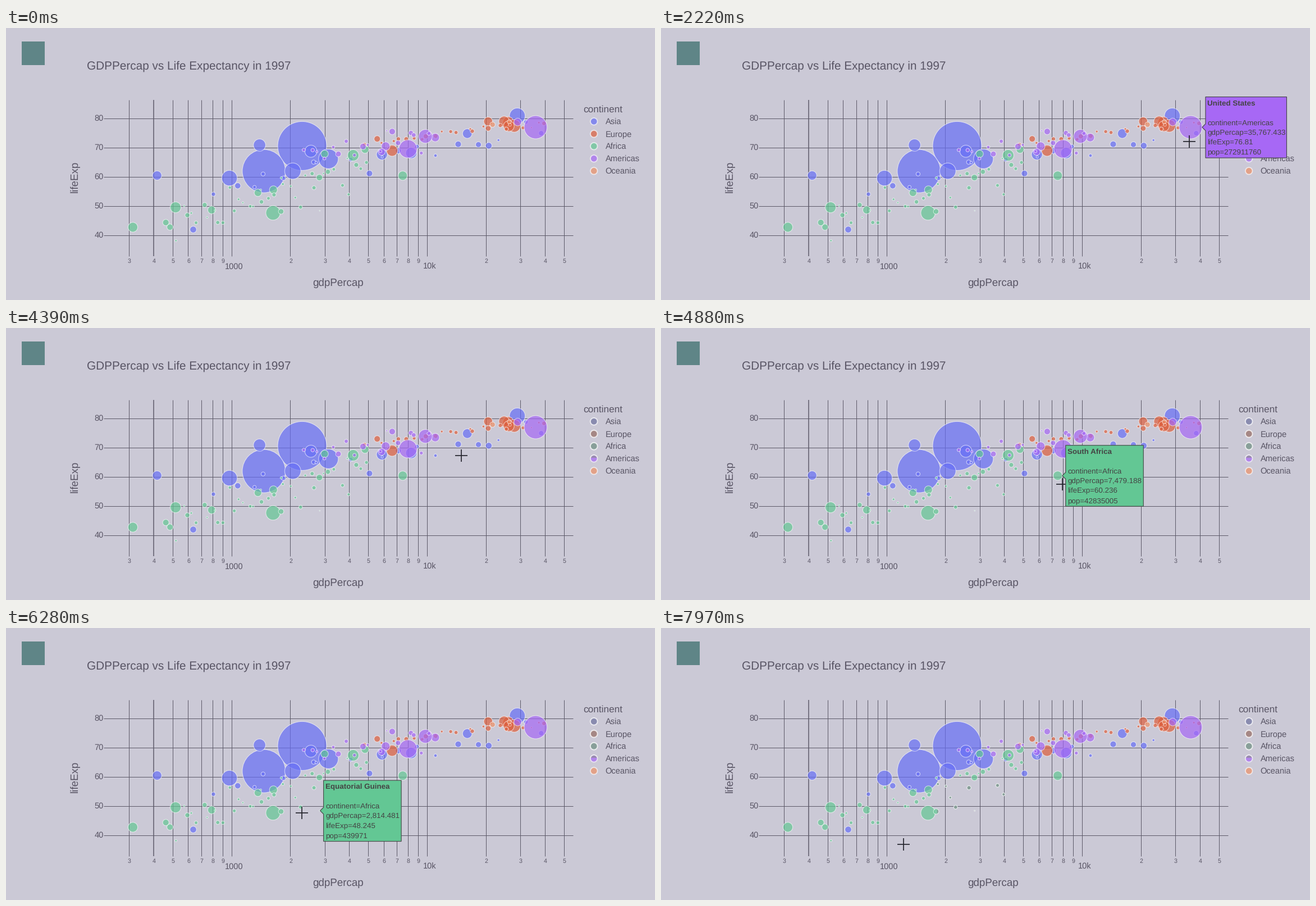
Write a matplotlib script that moves like this. It is 1156 by 484 pixels and loops after 8 s.

```python
import numpy as np
import matplotlib.pyplot as plt
from matplotlib.animation import FuncAnimation
from matplotlib.collections import EllipseCollection
from matplotlib.colors import to_rgb
from matplotlib.patches import Polygon, Rectangle

plt.rcParams.update({"font.family": "Liberation Sans", "text.hinting": "none",
                     "toolbar": "None"})

W, H = 1156, 484
LOOP, STEP = 8000, 40
BACK, INK, GRID = "#cbc9d6", "#595565", "#5d5a69"
GREY = (0.44, 0.44, 0.455)

COLORS = {"Asia": "#676ff6", "Europe": "#dd5f3d", "Africa": "#63c794",
          "Americas": "#a768f5", "Oceania": "#ec9068"}

# Largest countries: GDP per head, life expectancy, population in millions
LARGE = {
    "Asia": [(635, 41.8, 22), (973, 59.4, 123), (2289, 70.4, 1230), (1459, 61.8, 959),
             (3119, 66, 199), (8264, 68, 63), (28817, 80.7, 126), (415, 60.3, 43),
             (2049, 61.8, 136), (2537, 68.6, 75), (20587, 70.5, 21),
             (5853, 67.5, 60), (1386, 70.7, 76)],
    "Europe": [(25890, 78.6, 59), (27789, 77.3, 82), (24675, 78.8, 57),
               (20445, 78.8, 40), (6601, 68.8, 63), (26075, 77.2, 59)],
    "Africa": [(4797, 69.2, 29), (312, 42.6, 48), (4173, 67.2, 66), (516, 49.4, 60),
               (1360, 54.4, 28), (2982, 67.7, 28), (1625, 47.5, 106),
               (1632, 55.4, 32), (789, 48.5, 31)],
    "Americas": [(10967, 73.3, 36), (7958, 69.4, 169), (28955, 78.6, 30),
                 (6117, 70.3, 38), (9767, 73.7, 96), (5838, 68.4, 25)],
    "Oceania": [],
}

# The rest follow a trend: count, GDP range, life range, spread, typical population
TREND = {
    "Asia": (18, 700, 40000, 58, 77, 2.5, 9),
    "Europe": (24, 4700, 41000, 71, 79, 0.8, 7),
    "Africa": (40, 450, 5000, 45, 61, 4.5, 6),
    "Americas": (18, 2200, 11000, 67, 74.5, 2.2, 6),
    "Oceania": (2, 21050, 27000, 77.6, 78.8, 0, 9),
}

# name, continent, GDP, life expectancy, population, shown from, shown until
HOVERS = [
    ("United States", "Americas", 35767.433, 76.81, 272911760, 2150, 3310),
    ("Korea, Rep.", "Asia", 15993.528, 74.647, 46173816, 3660, 4370),
    ("South Africa", "Africa", 7479.188, 60.236, 42835005, 4830, 5650),
    ("Equatorial Guinea", "Africa", 2814.481, 48.245, 439971, 6200, 6340),
    ("Cote d'Ivoire", "Africa", 1786.265, 47.991, 14625967, 6340, 7270),
]

# Pointer moves: from time, until time, bend, end point
START, APPEARS = (1084, 469), 1490
MOVES = [
    (1510, 2270, (955, 245), (939, 196)),
    (2310, 2390, (939, 193), (938, 190)),
    (3230, 3770, (844, 268), (822, 192)),
    (4310, 4980, (777, 354), (699, 261)),
    (5580, 6440, (597, 336), (497, 329)),
    (7200, 7610, (468, 359), (439, 389)),
    (7940, 7970, (436, 387), (432, 385)),
]


def to_x(gdp):
    return 402.2 + 348.4 * np.log10(np.asarray(gdp) / 1000)


def to_y(life):
    return 160 + (80 - np.asarray(life)) * 5.2


def to_r(millions):
    return 43.5 * np.sqrt(np.asarray(millions) / 1230)


def blend(a, b, share):
    return tuple(share * np.array(to_rgb(a)) + (1 - share) * np.array(to_rgb(b)))


fig = plt.figure(figsize=(W / 72, H / 72), dpi=72, facecolor=BACK)
ax = fig.add_axes([0, 0, 1, 1])
ax.set(xlim=(0, W), ylim=(H, 0))
ax.axis("off")


def write(x, y, text, size, color=INK, ha="left", **kw):
    """Text whose capitals are centred on y."""
    return ax.text(x, y + 0.36 * size, text, fontsize=size, color=color, ha=ha,
                   va="baseline", **kw)


def line(xs, ys, **kw):
    style = dict(color=GRID, lw=1, solid_capstyle="butt", zorder=1)
    return ax.plot(xs, ys, **{**style, **kw})[0]


def bubbles(spots, radii, owners, lw, within=None):
    """Translucent discs, or a greyed copy confined to the box `within`."""
    size = 2 * np.asarray(radii)
    if within is None:
        fills = [to_rgb(COLORS[c]) + (0.7,) for c in owners]
    else:
        fills = [blend(blend(COLORS[c], GREY, 0.33), BACK, 0.7) for c in owners]
    discs = EllipseCollection(size, size, np.zeros(len(size)), units="xy",
                              offsets=spots, offset_transform=ax.transData,
                              facecolors=fills, edgecolors=[(1, 1, 1, .65)],
                              linewidths=lw, zorder=2 if within is None else 3)
    ax.add_collection(discs)
    if within is not None:
        left, top, right, bottom = within
        discs.set_clip_path(Rectangle((left, top), right - left, bottom - top,
                                      transform=ax.transData))
    return discs


def draw_frame():
    ax.add_patch(Rectangle((27.5, 24), 41.5, 41.5, fc="#5f8587", ec="none"))
    write(144.5, 66.4, "GDPPercap vs Life Expectancy in 1997", 20.75)
    write(592, 452.1, "gdpPercap", 18.7, ha="center")
    ax.text(123, 264.5, "lifeExp", fontsize=18.7, color=INK, rotation=90,
            ha="center", va="center")
    for life in range(40, 90, 10):
        y = to_y(life)
        line((174, 1010), (y + 0.9, y + 0.9))
        write(174, y, str(life), 14.6, ha="right")
    for power in (2, 3, 4):
        for digit in range(1, 10):
            gdp = digit * 10 ** power
            if not 300 <= gdp <= 50000:
                continue
            x = to_x(gdp)
            line((x - 0.6, x - 0.6), (127.5, 406), lw=1.5 if gdp == 400 else 1)
            if digit > 1:
                write(x, 414, str(digit), 10.6, ha="center")
            else:
                write(x + 3.8, 424, "1000" if power == 3 else "10k", 14.6, ha="center")


def legend_keys():
    write(1028.5, 144.1, "continent", 17.3)
    rows = 166.3 + 22 * np.arange(len(COLORS))
    for name, y in zip(COLORS, rows):
        write(1067.5, y + 0.3, name, 14.6)
    spots = np.column_stack((np.full(len(rows), 1047.2), rows))
    return spots, np.full(len(rows), 6.2), list(COLORS), 1.8


def country_marks():
    rng = np.random.default_rng(7)
    rows, owners = [], []
    for name, (count, low, high, life0, life1, spread, pop) in TREND.items():
        along = np.clip((np.arange(count) + rng.uniform(0, 1, count)) / count, 0, 1)
        gdp = low * (high / low) ** along
        life = life0 + (life1 - life0) * along + rng.normal(0, 1, count) * spread
        size = np.minimum(pop * rng.lognormal(0, 0.8, count), 20)
        members = LARGE[name] + list(zip(gdp, life, size))
        members += [(h[2], h[3], h[4] / 1e6) for h in HOVERS if h[1] == name]
        rows += members
        owners += [name] * len(members)
    gdp, life, pop = np.array(rows).T
    return np.column_stack((to_x(gdp), to_y(life))), to_r(pop), owners, 1


def draw_hover(name, continent, gdp, life, pop, *_):
    y, tip = float(to_y(life)), float(to_x(gdp) + to_r(pop / 1e6))
    left, top, bottom = tip + 6, y - 54, y + 54.5
    right = left + (144.5 if gdp >= 10000 else 138.5)
    ink = "white" if continent == "Asia" else "#444444"
    shape = [(tip, y), (left, y - 6), (left, top), (right, top),
             (right, bottom), (left, bottom), (left, y + 6)]
    parts = [ax.add_patch(Polygon(shape, fc=COLORS[continent], ec=ink, lw=1.1,
                                  zorder=6))]
    rows = [name, "", f"continent={continent}", f"gdpPercap={gdp:,}",
            f"lifeExp={life}", f"pop={pop}"]
    for i, row in enumerate(rows):
        parts.append(write(left + 3.5, top + 10.3 + 17.4 * i, row, 13.4, ink, zorder=7,
                           weight="normal" if i else "bold"))
    return parts, (tip - 3, top, right, bottom)


draw_frame()
keys, marks = legend_keys(), country_marks()
bubbles(*keys)
bubbles(*marks)
hovers = [draw_hover(*h) for h in HOVERS]

# What the first and last label uncover comes back greyed
stains = [(bubbles(*keys, within=hovers[0][1]), HOVERS[0][6]),
          (bubbles(*marks, within=hovers[-1][1]), HOVERS[-1][6])]

ARROW = np.array([(0, 0), (0, 15.5), (3.6, 12.2), (6, 18), (8.6, 16.9),
                  (6.2, 11.3), (11, 11.3)])
arrow = ax.add_patch(Polygon(ARROW, fc="white", ec="#222222", lw=1, zorder=5))
cross = [line((), (), color="#24242c", lw=1.7, zorder=5) for _ in range(2)]


def pointer(t):
    here = np.array(START, float)
    for begin, end, bend, goal in MOVES:
        u = np.clip((t - begin) / (end - begin), 0, 1)
        here = ((1 - u) ** 2 * here + 2 * u * (1 - u) * np.array(bend)
                + u ** 2 * np.array(goal))
        if u < 1:
            break
    return here


def update(frame):
    t = frame * STEP + 30
    x, y = pointer(t)
    shown = t >= APPEARS
    in_plot = 174 < x < 1010 and 127 < y < 406
    arrow.set_visible(shown and not in_plot)
    arrow.set_xy(ARROW + (x, y))
    cross[0].set_data((x - 11, x + 11), (y, y))
    cross[1].set_data((x, x), (y - 11, y + 11))
    for arm in cross:
        arm.set_visible(shown and in_plot)
    for (*_, begin, end), (parts, _) in zip(HOVERS, hovers):
        for part in parts:
            part.set_visible(begin <= t < end)
    for stain, since in stains:
        stain.set_visible(t >= since)
    return [arrow, *cross]


anim = FuncAnimation(fig, update, frames=LOOP // STEP, interval=STEP,
                     repeat=True, repeat_delay=0, blit=False)
plt.show()
```
